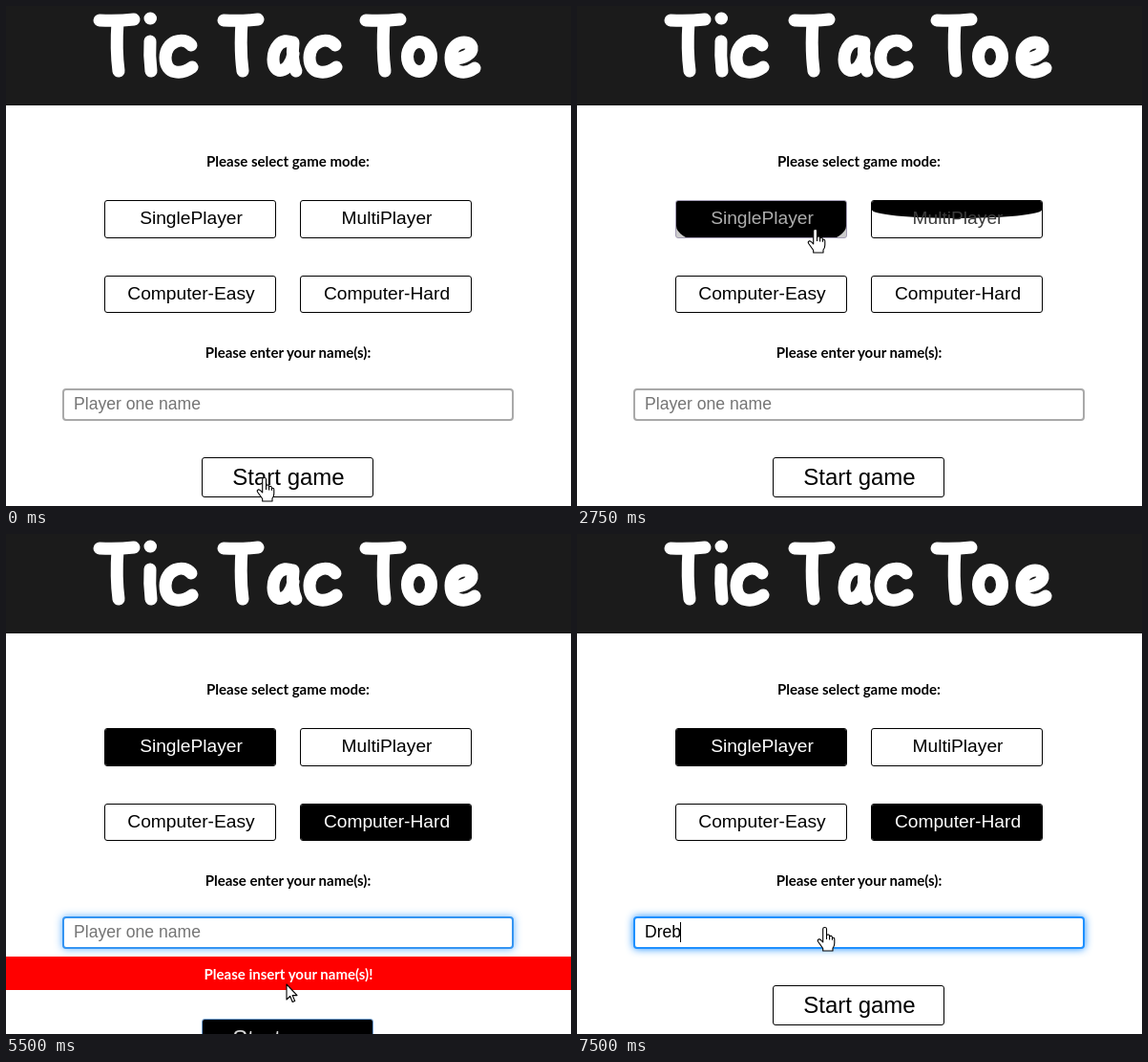
These frames come from a looping animation (592 px wide and 523 px high, 8 s). An HTML page:

```html
<!DOCTYPE html>
<html lang="en">
<head>
<meta charset="utf-8">
<title>Game setup</title>
<style>
html, body { margin: 0; width: 100%; height: 100%; overflow: hidden; background: #fff; }
body { position: relative; font-family: "Liberation Sans", Arial, sans-serif; }
body > * { position: absolute; box-sizing: border-box; }
header { left: 0; top: 0; width: 592px; height: 104px; background: #1b1b1b; }
header svg { display: block; fill: none; stroke: #fff; stroke-width: 13; stroke-linecap: round; stroke-linejoin: round; }
.note { left: 0; width: 591px; height: 36px; margin: 0; text-align: center; font: 700 15px/36px Lato, sans-serif; }
.btn { width: 180px; height: 40px; padding: 0 0 2px 2px; border: 1px solid; border-radius: 3px; overflow: hidden;
  display: flex; align-items: center; justify-content: center; font-size: 19.2px; }
.btn i { position: absolute; left: 0; top: 0; width: 100%; background: #000; border-radius: 0 0 50% 50%; }
.btn span { position: relative; white-space: nowrap; }
.left { left: 103px; }
.right { left: 308px; }
.upper { top: 203px; }
.lower { top: 282px; height: 39px; }
#start { left: 205px; top: 472px; height: 42px; padding-bottom: 0; font-size: 24px; }
#field { left: 59px; top: 400px; width: 473px; height: 34px; padding: 0 10px 2px; border: 2px solid;
  border-radius: 4px; background: #fff; display: flex; align-items: center; font-size: 17.6px; white-space: nowrap; }
#caret { width: 1px; height: 21px; margin-left: -1px; background: #000; }
#hint { color: #757575; }
#error { width: 592px; top: 442px; height: 35px; background: #f00; color: #fff; }
#cursor { left: 0; top: 0; overflow: visible; fill: #fff; stroke: #000; stroke-width: 1.1; stroke-linejoin: round; }
</style>
</head>
<body>
<header>
  <svg width="592" height="104" role="img" aria-label="Tic Tac Toe">
    <defs>
      <path id="T" d="M6 2Q25 3 42 1M25 3Q23 33 26 55"/>
      <path id="c" d="M194 41C186 31 167 37 167 54C167 72 184 72 195 64"/>
    </defs>
    <use href="#T" x="92" y="13"/>
    <path d="M151 37Q150 52 152 68M151 13h.5"/>
    <use href="#c"/>
    <use href="#T" x="222" y="13"/>
    <path d="M301 39C288 31 280 45 280 56C280 73 297 71 301 50M301 38Q299 58 304 68"/>
    <use href="#c" x="151"/>
    <use href="#T" x="371" y="13"/>
    <ellipse cx="433" cy="53" rx="12.5" ry="15.5"/>
    <path d="M466 55C480 56 489 50 488 43C485 34 466 37 466 54C466 71 481 72 491 65"/>
  </svg>
</header>
<p class="note" style="top:144px">Please select game mode:</p>
<div class="btn left upper" id="single"><i></i><span>SinglePlayer</span></div>
<div class="btn right upper" id="multi"><i></i><span>MultiPlayer</span></div>
<div class="btn left lower" id="easy"><i></i><span>Computer-Easy</span></div>
<div class="btn right lower" id="hard"><i></i><span>Computer-Hard</span></div>
<p class="note" style="top:344px">Please enter your name(s):</p>
<div id="field"><span id="typed"></span><b id="caret"></b><span id="hint">Player one name</span></div>
<p class="note" id="error">Please insert your name(s)!</p>
<div class="btn" id="start"><i></i><span>Start game</span></div>
<svg id="cursor" width="24" height="30">
  <g id="hand" transform="translate(0 -1)">
    <path d="M-2.3 16V2Q-2.3 .5-.4 .5T1.5 2V9Q2 7.6 3.6 8.1 4.6 8.5 4.6 10 5.6 8.9 6.8 9.6 7.5 10.1 7.5 11.4 9.8 10.6 9.8 13V17Q9.8 20 8 22V25H-2.3V22.5L-7.3 15.5Q-8.4 13.6-6.8 12.9-5.3 12.5-3.8 14.3Z"/>
    <path d="M1.5 9v4M4.6 10v3.5M7.5 11v2.8"/>
  </g>
  <path id="arrow" d="M0 0V16L3.7 12.5 6.2 18.5 8.7 17.5 6.2 11.6H11Z"/>
</svg>
<script>
const LOOP = 8000, STEP = 250, FADE = 400, TICK = 5;
const $ = id => document.getElementById(id);
const buttons = [...document.querySelectorAll(".btn")];
const zones = [...buttons, $("field")];

// Pointer route: time, x, y.
const route = [
  [0, 271, 494], [350, 235, 238], [740, 245, 222], [1000, 344, 218], [1250, 385, 224],
  [2000, 400, 238], [2462, 320, 240], [2512, 270, 240], [2750, 250, 234], [3350, 340, 292],
  [3700, 366, 295], [4000, 323, 352], [4250, 300, 411], [4800, 300, 412], [5000, 307, 494],
  [5400, 307, 494], [5750, 260, 412], [LOOP, 260, 412]
];
const clicks = [[2740, "single"], [3600, "hard"], [4300, "field"], [5400, "start"], [5800, "field"]];
const chosen = ["single", "hard"];
const typing = { name: "Dreb", from: 6900, pace: 150 };

const clamp = v => Math.min(1, Math.max(0, v));
const ease = v => v * v * (3 - 2 * v);

function pointer(t) {
  const next = route.findIndex(p => p[0] > t);
  const [t0, x0, y0] = route[next - 1], [t1, x1, y1] = route[next];
  const k = (t - t0) / (t1 - t0);
  return [x0 + (x1 - x0) * k, y0 + (y1 - y0) * k];
}

const failed = t => t >= 5400 && t < typing.from;
const drop = (el, t) => el.id === "start" && failed(t) ? 35 : 0;
const lastClick = t => clicks.filter(c => c[0] <= t).pop() || [0, ""];
const picked = (id, t) => chosen.includes(id) && clicks.some(c => c[1] === id && c[0] <= t);

const boxes = new Map(zones.map(el => [el, [el.offsetLeft, el.offsetTop, el.offsetWidth, el.offsetHeight]]));

function hovers(el, t) {
  const [px, py] = pointer(t), [x, y, w, h] = boxes.get(el);
  const dx = px - x, dy = py - y - drop(el, t);
  return dx >= 0 && dx < w && dy >= 0 && dy < h;
}

// Fades in while the condition holds and out while it does not.
function fade(active, t) {
  let p = 0;
  for (let s = 0; s < t; s += TICK) p = clamp(p + (active(s) ? TICK : -TICK) / FADE);
  return ease(p);
}

function drawButton(el, t) {
  const p = fade(s => hovers(el, s) || picked(el.id, s), t), shade = Math.round(255 * p);
  const [time, focus] = lastClick(t), focused = focus === el.id;
  const pressed = focused && t - time < 60;
  el.firstChild.style.height = 200 * p + "%";
  el.lastChild.style.color = `rgb(${shade},${shade},${shade})`;
  el.style.background = pressed ? "#ccc" : "#fff";
  el.style.borderColor = pressed ? "#a39cb4" : focused ? "#6b9bd1" : "#000";
  el.style.transform = `translateY(${drop(el, t)}px)`;
}

function drawField(t) {
  const p = fade(s => lastClick(s)[1] === "field", t);
  const mix = (a, b) => Math.round(a + (b - a) * p);
  $("field").style.borderColor = `rgb(${mix(169, 30)},${mix(169, 144)},${mix(169, 255)})`;
  $("field").style.boxShadow = `0 0 8px rgba(30,144,255,${clamp(2 * p - 1)})`;

  const count = Math.max(0, Math.ceil((t - typing.from) / typing.pace));
  $("typed").textContent = typing.name.slice(0, count);
  $("hint").style.display = count ? "none" : "";

  const [time, focus] = lastClick(t);
  const lit = count > 0 || focus === "field" && (t - time) % 1000 < 500;
  $("caret").style.visibility = lit ? "visible" : "hidden";
}

function drawCursor(t) {
  const [x, y] = pointer(t), over = zones.some(el => hovers(el, t));
  $("cursor").style.transform = `translate(${Math.round(x)}px,${Math.round(y)}px)`;
  $("hand").style.display = over ? "" : "none";
  $("arrow").style.display = over ? "none" : "";
}

function draw(t) {
  buttons.forEach(el => drawButton(el, t));
  drawField(t);
  drawCursor(t);
  $("error").style.display = failed(t) ? "" : "none";
}

let shown = -1;
function frame() {
  const t = Math.floor(performance.now() % LOOP / STEP) * STEP;
  if (t !== shown) draw(shown = t);
  requestAnimationFrame(frame);
}
frame();
</script>
</body>
</html>
```
